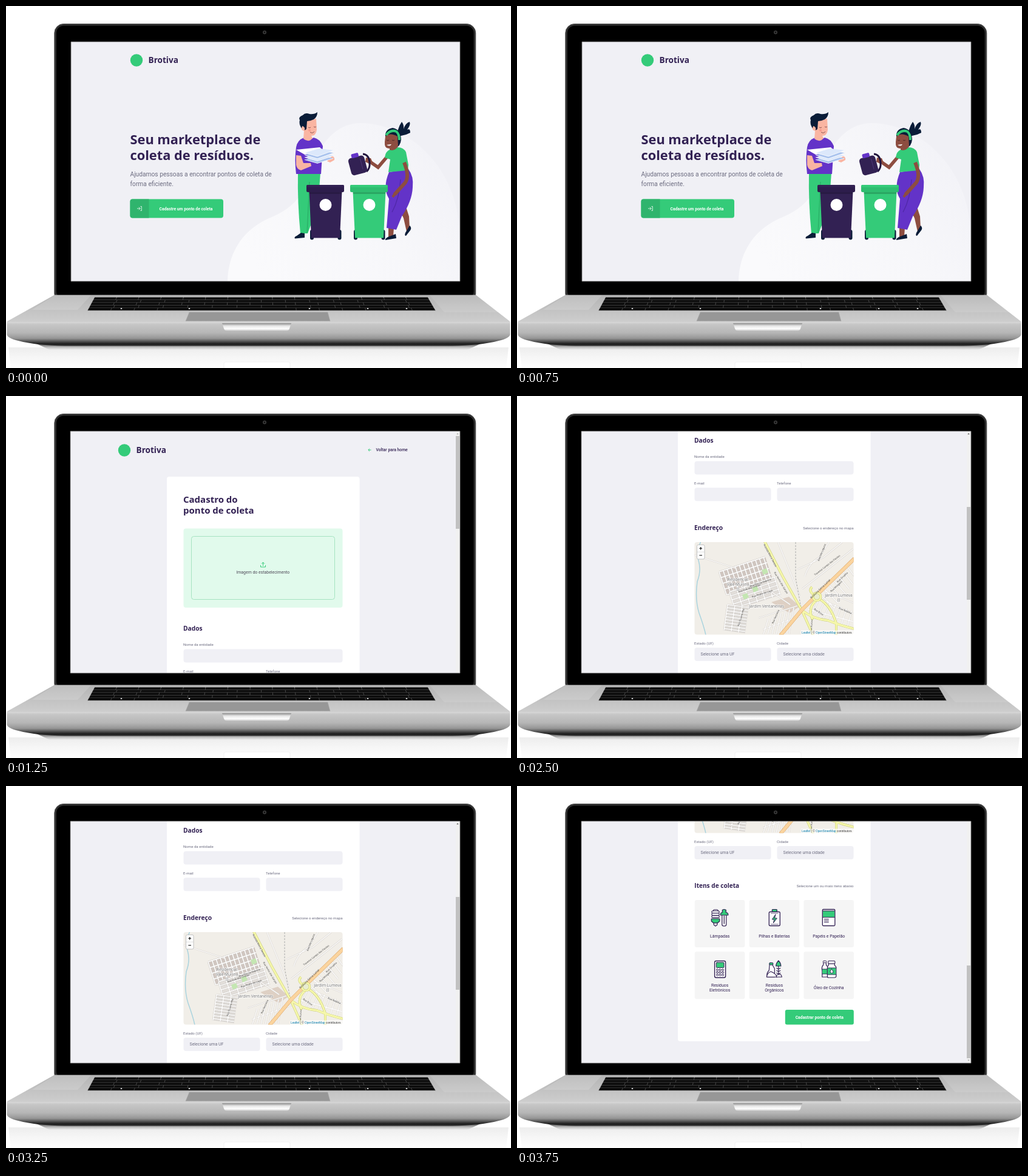
An HTML page with a canvas that plays this animation: 832x597 px, repeating every 5 s.

```html
<!DOCTYPE html>
<html lang="pt-BR">
<head>
<meta charset="utf-8">
<title>Brotiva</title>
<style>
html, body { margin: 0; width: 100%; height: 100%; overflow: hidden; background: #fff; }
canvas { display: block; width: 832px; height: 597px; }
</style>
</head>
<body>
<canvas id="stage" width="832" height="597"></canvas>
<script>
const ctx = document.getElementById('stage').getContext('2d');
const GREEN = '#34cb79', DARK = '#322153', PURPLE = '#6333c8', NAVY = '#0a1c38';
const PAGE = '#f0f0f5', GREY = '#6c6c80', PINK = '#fab5a2', BROWN = '#8d4d40';
const body = (size, weight = 400) => `${weight} ${size}px Roboto, sans-serif`;
const title = size => `700 ${size}px "Open Sans", "Noto Sans", sans-serif`;

const SCREENS = [
  { draw: home, box: [107, 59, 641, 395] },
  { draw: form, box: [106, 58, 642, 399], scroll: 0, thumb: 66 },
  { draw: form, box: [106, 58, 642, 399], scroll: 310, thumb: 183 },
  { draw: form, box: [106, 58, 642, 399], scroll: 626, thumb: 296 }
];
const HOLD = 1250;

function shape(d, fill, stroke, width = 1) {
  const p = new Path2D(d);
  if (fill) { ctx.fillStyle = fill; ctx.fill(p); }
  if (stroke) { ctx.strokeStyle = stroke; ctx.lineWidth = width; ctx.stroke(p); }
}
const line = (d, color, width) => shape(d, null, color, width);

function box(x, y, w, h, r, fill, stroke, width = 1) {
  ctx.beginPath();
  ctx.roundRect(x, y, w, h, r);
  if (fill) { ctx.fillStyle = fill; ctx.fill(); }
  if (stroke) { ctx.strokeStyle = stroke; ctx.lineWidth = width; ctx.stroke(); }
}

function disc(x, y, rx, fill, ry = rx) {
  ctx.beginPath();
  ctx.ellipse(x, y, rx, ry, 0, 0, 7);
  ctx.fillStyle = fill;
  ctx.fill();
}

function text(s, x, y, font, color, align = 'left') {
  ctx.font = font;
  ctx.fillStyle = color;
  ctx.textAlign = align;
  ctx.fillText(s, x, y);
}

function tilted(s, x, y, deg, size = 4) {
  ctx.save();
  ctx.translate(x, y);
  ctx.rotate(deg * Math.PI / 180);
  text(s, 0, 1.4, `${size}px "Noto Sans", sans-serif`, '#444', 'center');
  ctx.restore();
}

function fade(x0, y0, x1, y1, ...stops) {
  const g = ctx.createLinearGradient(x0, y0, x1, y1);
  stops.forEach(([at, color]) => g.addColorStop(at, color));
  return g;
}

function laptop() {
  ctx.fillStyle = '#fff';
  ctx.fillRect(0, 0, 832, 597);

  // reflection and ground shadow
  shape('M4 563H828L824 597H8Z', fade(0, 563, 0, 597, [0, '#ededed'], [.5, '#f6f6f6'], [1, '#fdfdfd']));
  box(359, 587, 109, 14, 3, '#fff', '#f0f0f0');
  shape('M48 556H784L760 567H72Z', fade(0, 559, 0, 567, [0, '#777'], [.5, '#c4c4c4'], [1, '#eee']));

  // lid
  box(79.8, 29.5, 694, 460, 15, '#2e2e2e', '#565656', 1);
  box(83, 32.5, 687.6, 450, 12, '#000');
  disc(426, 43.5, 3, '#3c3c3c');
  disc(426, 43.5, 1.4, '#111');

  // deck
  shape('M80 476.5H774L830 520V526H2V520Z', fade(0, 477, 0, 524, [0, '#b4b4b4'], [.5, '#c2c2c2'], [1, '#cfcfcf']));
  shape('M80 477H140L118 501H43Z', 'rgba(255,255,255,.14)');
  shape('M698 477H774L812 505H722Z', 'rgba(255,255,255,.1)');
  shape('M302 505H530L534 519.5H296Z', '#979797', '#aaa', .6);

  // front edge
  shape('M1.5 521H830.5V542Q829 548 812 552Q780 560 735 560.5H97Q52 560 20 552Q3 548 1.5 542Z',
    fade(0, 521, 0, 561, [0, '#d8d8d8'], [.1, '#c6c6c6'], [.45, '#b6b6b6'], [.68, '#959595'], [.8, '#555'], [.9, '#1e1e1e'], [1, '#333']));
  shape('M356 523H470L467 532Q466 535.5 462 535.5H364Q360 535.5 359 532Z',
    fade(0, 523, 0, 536, [0, '#8c8c8c'], [.35, '#e5e5e5'], [.7, '#fff'], [1, '#c9c9c9']));
  keyboard();
}

function keyboard() {
  shape('M146 480.5H695L708 502.5H134Z', '#484848', '#bbb', .6);
  const rows = 5, left = y => 146 - (y - 480) * .53, right = y => 695 + (y - 480) * .57;
  for (let r = 0; r < rows; r++) {
    const y = 480.5 + r * 4.4, b = y + 3.7, keys = 15 - r % 2;
    for (let k = 0; k < keys; k++) {
      const at = (yy, u) => left(yy) + (right(yy) - left(yy)) * u / keys;
      let from = k, to = k + 1;
      if (r === 4) {
        if (k > 3 && k < 9) continue;
        if (k === 3) to = 9;
      }
      shape(`M${at(y, from) + .5} ${y}H${at(y, to) - .5}L${at(b, to) - .5} ${b}H${at(b, from) + .5}Z`, '#0c0c0c');
    }
  }
  for (const x of [190, 302, 500, 596, 660]) disc(x, 499, 1.4, '#ddd', 1);
}

function brand(x) {
  disc(x, 89.5, 10.2, GREEN);
  text('Brotiva', x + 19.5, 94, title(13.6), DARK);
}

function home() {
  shape('M365 455C366 402 394 366 438 348C490 326 493 295 508 258C524 215 552 193 585 193C660 194 748 262 748 385V455Z',
    fade(430, 455, 730, 230, [0, '#fafafc'], [.55, '#f7f7fa'], [1, '#f2f2f7']));
  brand(215);
  text('Seu marketplace de', 204.5, 228, title(21.8), DARK);
  text('coleta de resíduos.', 204.5, 254, title(21.8), DARK);
  text('Ajudamos pessoas a encontrar pontos de coleta de', 204.5, 281, body(10.22), GREY);
  text('forma eficiente.', 204.5, 297, body(10.22), GREY);
  box(204.5, 318.5, 153.5, 31, 4, GREEN);
  box(204.5, 318.5, 31, 31, [4, 0, 0, 4], '#2fb46d');
  line('M216 334H221M219 331.7L221.3 334L219 336.3M221.5 330.5H223.3V337.5H221.5', '#fff', .8);
  text('Cadastre um ponto de coleta', 296.5, 336.5, body(6.8, 700), '#fff', 'center');
  man();
  woman();
  bin(526.5, '#2d1d4c', DARK);
  bin(598.5, '#2fbd70', GREEN);
}

function bin(x, lid, side) {
  for (const s of [-22.5, 23]) box(x + s - 3, 369, 6, 16.5, 3, NAVY);
  shape(`M${x - 27} 305H${x + 27}L${x + 23.5} 382.5H${x - 23.5}Z`, side);
  shape(`M${x - 27} 307H${x + 27}L${x + 26.7} 310H${x - 26.7}Z`, 'rgba(0,0,0,.18)');
  box(x - 31.5, 295, 62, 12, 2.5, lid);
  box(x - 31.5, 295, 62, 4, 2, side);
  disc(x, 328, 10, '#fff');
}

function man() {
  shape('M481 275H518L514 330L497 375H485Q480 324 481 275Z', GREEN);
  line('M500 290L496 374', '#27a862', 1);
  shape('M486 374L492 375V382L476 383.5Q474 381 479 379Z', NAVY);
  shape('M491 217Q480 221 478 233Q475 253 478 277H519L522 231Q517 219 507 217Q500 222 491 217Z', PURPLE);
  shape('M491 189L511 186L512 204Q511 214 503 214L505 218Q499 226 490 219L491 206Q486 205 487 199Q490 196 492 200Z', PINK);
  shape('M487 202Q482 194 484 188Q481 183 489 180Q493 175 500 178Q508 179 513 175Q513 183 507 187Q501 190 496 190L495 203L492 205Q492 198 488 198Z', NAVY);
  disc(489.5, 202, 2.6, PINK);
  line('M498 200Q500 202 502 200M507 199Q509 201 511 199M501 208Q505 211 508 207', '#703b3e', .8);
  disc(500, 205, 2, '#f79b8d');
  shape('M478 246L486 247L490 259L502 259L503 264L486 271Q479 269 478 262Z', PINK);
  shape('M537 247Q542 249 541 254L534 258L529 256Z', PINK);
  shape('M478 237L517 233L523 239L492 245Z', '#fff');
  for (let i = 3; i >= 0; i--) {
    const y = 242 + i * 3.8;
    shape(`M492 ${y}L516 ${y - 7}L540 ${y - 4 + i * .5}L513 ${y + 6}Z`, i % 2 ? '#a9c3ee' : '#dce8fb');
    line(`M492 ${y}L513 ${y + 6}L539 ${y - 3.5 + i * .5}`, '#fff', .8);
  }
}

function woman() {
  // legs and shoes
  shape('M657 325L664 347L665 367L660 372L655 350L648 335Z', BROWN);
  shape('M665 362Q669 366 666 370L659 379Q656 379 658 374Z', NAVY);
  shape('M630 365H639L638 380L630 382Z', BROWN);
  shape('M629 381L642 376L643 383L625 386Q624 384 629 381Z', NAVY);
  shape('M631 274L663 269Q672 281 670 299Q669 322 652 347L643 369L627 366L631 318Q620 300 631 274Z', PURPLE);
  line('M650 286Q648 318 636 340', '#4f28a5', 1.2);
  // hair
  shape('M646 216Q643 204 652 191Q656 196 655 203Q658 193 665 191Q667 196 661 204Q666 201 666 209Q659 213 651 214Z', NAVY);
  shape('M625 216Q624 203 637 201Q650 203 651 220Q650 232 641 234Z', NAVY);
  // arm, head, top
  line('M630 246L613 266L597 255', BROWN, 5.5);
  shape('M593 250L601 251L604 258L598 260L592 257Z', BROWN);
  shape('M625 215Q633 208 645 215L646 230L643 240H632V235Q623 236 624 224Z', BROWN);
  line('M626 213Q634 203 643 207Q648 211 648 221', GREEN, 4);
  line('M627 221Q629 223 631 221M636 221Q638 223 640 221', '#3d1c1c', .8);
  shape('M627 229L635 228Q633 232.5 627 229Z', '#fff');
  shape('M632 237Q639 240 645 233Q655 233 659 241L663 262L662 271L630 274L633 253L624 250Q625 240 632 237Z', GREEN);
  line('M656 258Q665 280 658 291L640 311', BROWN, 6);
  line('M642 308L637 315', BROWN, 4);
  // jug
  line('M588 244Q598 245 599 258Q600 268 594 273', '#21143d', 3);
  ctx.save();
  ctx.translate(579, 262.5);
  ctx.rotate(-.26);
  box(-13, -14, 27, 29, 5, DARK);
  box(-6, -20, 12, 7, 2, PURPLE);
  line('M7 -9V9', '#49346f', 1.2);
  ctx.restore();
}

function field(label, x, y, w, hint) {
  text(label, x - .5, y - 5.3, body(6.1), GREY);
  box(x, y, w, 22, 4, PAGE);
  if (hint) text(hint, x + 10, y + 13, body(7), GREY);
}

function form({ scroll, thumb }) {
  ctx.save();
  ctx.translate(0, -scroll);
  brand(195);
  line('M597 89H601.5M599 86.8L596.8 89L599 91.2', GREEN, 1);
  text('Voltar para home', 609.5, 91.3, body(6.8, 500), DARK);
  box(265, 133, 317.5, 914, 4, '#fff');
  text('Cadastro do', 292, 175.5, title(15), DARK);
  text('ponto de coleta', 292, 194, title(15), DARK);
  box(292.5, 218.5, 262, 130.5, 4, '#e1faec');
  box(305.5, 231.5, 236, 104, 4, null, '#a5e3c1');
  line('M419.5 279V282H427.5V279M423.5 280V274.5M421 276.7L423.5 274.2L426 276.7', GREEN, 1);
  text('Imagem do estabelecimento', 423.3, 293.3, body(6.93), '#4e4958', 'center');

  text('Dados', 292, 386.5, title(10.25), DARK);
  field('Nome da entidade', 292.5, 417.5, 262);
  field('E-mail', 292.5, 461.3, 126);
  field('Telefone', 428.5, 461.3, 126);

  text('Endereço', 292, 531, title(10.25), DARK);
  text('Selecione o endereço no mapa', 554.5, 530, body(6.1), GREY, 'right');
  ctx.save();
  ctx.translate(0, 310);
  map();
  ctx.restore();
  field('Estado (UF)', 292.5, 725, 126, 'Selecione uma UF');
  field('Cidade', 428.5, 725, 126, 'Selecione uma cidade');
  ctx.translate(.3, 626);
  items();
  ctx.restore();

  ctx.fillStyle = '#f1f1f1';
  ctx.fillRect(741, 58, 7, 399);
  ctx.fillStyle = '#c1c1c1';
  ctx.fillRect(741, thumb, 6, 153);
  if (scroll < 626) shape('M742.3 63.3L744 61.3L745.7 63.3Z', scroll ? '#505050' : '#a3a3a3');
  else shape('M742.3 451.5L744 453.5L745.7 451.5Z', '#a3a3a3');
}

function road(d, color, edge, width) {
  line(d, edge, width + 1);
  line(d, color, width);
}

function block(x, y, deg, w, h, dx, dy, fill) {
  ctx.save();
  ctx.translate(x, y);
  ctx.rotate(deg * Math.PI / 180);
  ctx.fillStyle = fill;
  ctx.fillRect(0, 0, w, h);
  let d = '';
  for (let i = 0; i <= w; i += dx) d += `M${i} 0V${h}`;
  for (let j = 0; j <= h; j += dy) d += `M0 ${j}H${w}`;
  road(d, '#fff', '#c9c4bf', 1.5);
  ctx.restore();
}

function map() {
  ctx.save();
  ctx.beginPath();
  ctx.roundRect(292.5, 241, 262, 152.5, 4);
  ctx.clip();
  ctx.fillStyle = '#f1eee8';
  ctx.fillRect(292, 241, 263, 153);
  line('M303 240Q294 258 299 271Q304 288 297 306Q293 336 300 358Q308 380 311 394', '#a9d3de', 1.5);

  // neighbourhoods
  block(333, 290, -18, 80, 40, 7, 10, '#d0c6c0');
  block(350, 323, -18, 79, 31, 13, 7, '#e2deda');
  block(347, 344, 8, 35, 43, 12, 5, '#dedbd7');
  shape('M419 340L448 331L466 347L449 358Z', '#ded0c4');
  for (const [x, y] of [[371, 328], [387, 316], [403, 287]])
    shape(`M${x} ${y}l8 -3l3 7l-8 4Z`, '#c4e6b2');
  let lanes = '';
  for (let i = 0; i < 7; i++) {
    lanes += `M${406 + i * 7} 393L${414 + i * 7} ${367 - i * 3}`;
    lanes += `M${484 + i * 10} ${363 + i * 3}L${498 + i * 9} ${335 + i * 3}`;
    lanes += `M${496 + i * 8} ${323 - i * 7}L${523 + i * 6} ${350 - i * 8}`;
  }
  lanes += 'M398 366L462 346M405 385L472 361M415 320L450 344M480 352L554 372M500 335L554 359M505 321L554 341M470 318L505 291L554 252M474 298Q480 276 498 266L514 241M462 286L505 266L536 241M292 262L360 284M430 241L466 330';
  road(lanes, '#fff', '#d4cfca', 1.3);
  ctx.setLineDash([3, 2]);
  line('M459 241L459 300L468 349', '#aaa', 1);
  ctx.setLineDash([]);

  // main roads
  const pale = '#f5f7ab', olive = '#c5c86c';
  road('M408 240L438 298L469 353L488 395M469 353Q488 368 512 370Q534 379 556 384M493 337Q478 350 487 369M486 315Q480 321 488 327M497 334Q517 345 526 375L526 395', pale, olive, 3);
  road('M434 395L469 353L492 330L556 268', '#fbd49e', '#d9a66b', 5);
  ctx.beginPath();
  ctx.arc(494, 331, 6.5, 0, 7);
  ctx.fillStyle = '#e9edd1';
  ctx.fill();
  ctx.strokeStyle = olive;
  ctx.lineWidth = 3.6;
  ctx.stroke();
  ctx.strokeStyle = pale;
  ctx.lineWidth = 2.6;
  ctx.stroke();

  tilted('Avenida Morro Sereno', 417, 263, 62);
  tilted('Avenida Laguna', 502, 258, -68);
  tilted('Travessa Campo das Flautas', 511, 279, -38);
  tilted('Rodovia Serra Lunar', 500, 318, -44, 4.7);
  tilted('Rua Vale dos Cristais', 383, 317, -18);
  tilted('Rua Flor da Neblina', 401, 308, -18);
  tilted('Rua Pedra do Lago', 404, 326, -18);
  tilted('Rua Ninho das Garças', 435, 308, 59);
  tilted('Rua Nuvem Alta', 369, 365, -73);
  tilted('Rua Ventania', 426, 364, -66);
  tilted('Rua Orvalho', 536, 299, -43);
  tilted('Rua Miragem', 526, 314, -43);
  tilted('Rua Brisa', 497, 356, 34);
  tilted('Rua Neblina', 541, 354, 23);
  tilted('Rua Aurora', 485, 379, -85);
  ctx.lineJoin = 'round';
  const place = (s, x, y) => {
    ctx.font = '6.5px "Noto Sans", sans-serif';
    ctx.textAlign = 'center';
    ctx.strokeStyle = 'rgba(255,255,255,.75)';
    ctx.lineWidth = 1.6;
    ctx.strokeText(s, x, y);
    text(s, x, y, ctx.font, '#777', 'center');
  };
  place('Residencial', 364, 305);
  place('Vale Murino', 364, 313);
  place('II', 364, 321);
  place('Jardim Ventaneiras', 411, 348.5);
  place('Jardim Lumeva', 530, 330.5);
  place('II', 530, 338.5);
  ctx.lineJoin = 'miter';

  box(296.5, 245.5, 12.5, 23.5, 2, '#fff', '#bbb', .9);
  line('M297 257.2H309', '#ccc', .6);
  line('M300.3 251.3H305.1M302.7 248.9V253.7M300.4 262.8H305', '#000', 1.1);

  ctx.fillStyle = 'rgba(255,255,255,.7)';
  ctx.fillRect(468, 386.5, 87, 8);
  let x = 469;
  for (const [s, color] of [['Leaflet', '#0078a8'], [' | © ', '#333'], ['OpenStreetMap', '#0078a8'], [' contributors', '#333']]) {
    text(s, x, 391.8, '4.75px "Liberation Sans", Arial, sans-serif', color);
    x += ctx.measureText(s).width;
  }
  ctx.restore();
}

function items() {
  text('Itens de coleta', 292, 168, title(10.1), DARK);
  text('Selecione um ou mais itens abaixo', 554.3, 166.8, body(6.1), GREY, 'right');
  const labels = [['Lâmpadas'], ['Pilhas e Baterias'], ['Papéis e Papelão'],
    ['Resíduos', 'Eletrônicos'], ['Resíduos', 'Orgânicos'], ['Óleo de Cozinha']];
  labels.forEach((rows, i) => {
    const x = 292.5 + i % 3 * 89.8, y = 188 + (i / 3 | 0) * 85.3;
    box(x, y, 82.5, 78, 3, '#f5f5f5');
    rows.forEach((s, k) => text(s, x + 41.3, y + 61.7 + (k - (rows.length - 1) / 2) * 8.4, body(6.9), DARK, 'center'));
  });
  ctx.lineJoin = ctx.lineCap = 'round';
  lamps();
  battery();
  paper();
  calculator();
  organic();
  bottles();
  ctx.lineJoin = 'miter';
  ctx.lineCap = 'butt';
  box(441.5, 369, 113, 24.5, 3, GREEN);
  text('Cadastrar ponto de coleta', 498, 383.8, body(6.85, 700), '#fff', 'center');
}

const ink = (d, fill, width = 1.2) => shape(d, fill, DARK, width);

function lamps() {
  for (let i = 0; i < 3; i++) box(320.5, 206 + i * 3.8, 12.5, 3.5, 1.7, '#fff', DARK, 1.1);
  ink('M323 206Q323 204 325 204H329Q331 204 331 206');
  ink('M320 219H333.5V223L330 226H323.5L320 223Z', GREEN);
  ink('M324 226H329.5V229L326.7 231L324 229Z', '#fff');
  ink('M337.5 213V229Q338 231 341 231Q344 231 344.5 229V213M341 214V227', null);
  ink('M335 213Q334.5 209 338 208.5V204.5Q341 202.5 344 204.5V208.5Q348 209 347.5 213Z', GREEN);
}

function battery() {
  box(420, 203.5, 8, 4, 1, GREEN, DARK, 1.2);
  box(415, 207.5, 18, 23, 2, '#fff', DARK, 1.3);
  line('M418 210H430M418 228H430', DARK, .7);
  ink('M425.5 212L420 220H423.5L422 226L428 218H424.5Z', GREEN, 1);
}

function paper() {
  box(503, 203.5, 20.5, 27, 1.5, '#fff', DARK, 1.3);
  shape('M503.8 206H522.8V216H503.8Z', GREEN);
  line('M503.5 206H523M503.5 216.5H523M506 219.5H513M506 222H513M506 224.5H513', DARK, 1);
}

function calculator() {
  box(325.3, 288.5, 18, 27.5, 2.5, '#fff', DARK, 1.4);
  box(328, 291, 12.7, 8.5, 1, GREEN, DARK, 1);
  for (let i = 0; i < 9; i++) box(328.3 + i % 3 * 4.5, 302 + (i / 3 | 0) * 4.2, 3, 2.5, .7, '#fff', DARK, .9);
}

function organic() {
  ink('M416 293H421V296L424 301V315H412Q410 309 415 304Z', '#fff');
  box(415.5, 291.5, 6, 3.5, 1, GREEN, DARK, 1);
  ink('M411 315Q412 308 418 306Q426 309 428 315Z', '#fff');
  ink('M430.5 288Q426 293 426.5 297H434.5Q434.5 292 430.5 288Z', GREEN);
  line('M430.5 297V312M427.5 300.5L430.5 302L433.5 300.5M427.5 304.5L430.5 306L433.5 304.5M427.5 308.5L430.5 310L433.5 308.5', DARK, 1.2);
  ink('M427 315Q427 311 430.5 311Q435 309 436 315Z', '#fff');
}

function bottles() {
  ink('M504.5 291H509V295Q513 299 512 305V315H502.5V305Q501 298 504.5 295Z', '#fff');
  shape('M502.8 302H512V310H502.8Z', GREEN);
  line('M502.5 302H512M502.5 310H512', DARK, .9);
  box(504, 288.5, 5.5, 3, 1, '#fff', DARK, 1);
  ink('M513 293H523V296Q525.5 297 525.5 300V314Q525 316 523 316H513Q511 316 511 314V300Q511 297 513 296Z', '#fff');
  shape('M511.6 300H525V311H511.6Z', GREEN);
  line('M511 300H525.5M511 311H525.5', DARK, .9);
  box(512.5, 288.5, 11, 4.5, 1, '#fff', DARK, 1.1);
  ink('M518 302Q514.5 306 516.5 308Q518.3 309.3 520 308Q521.5 306 518 302Z', '#fff', .9);
}

let shown = -1;
function tick() {
  const now = Math.floor(performance.now() / HOLD) % SCREENS.length;
  if (now !== shown) {
    shown = now;
    const screen = SCREENS[now];
    laptop();
    ctx.save();
    ctx.beginPath();
    ctx.rect(...screen.box);
    ctx.clip();
    ctx.fillStyle = PAGE;
    ctx.fillRect(...screen.box);
    screen.draw(screen);
    ctx.restore();
    // soft rim where the display meets the bezel
    box(...screen.box, 0, null, 'rgba(120,120,120,.8)');
  }
  requestAnimationFrame(tick);
}
tick();
</script>
</body>
</html>
```
